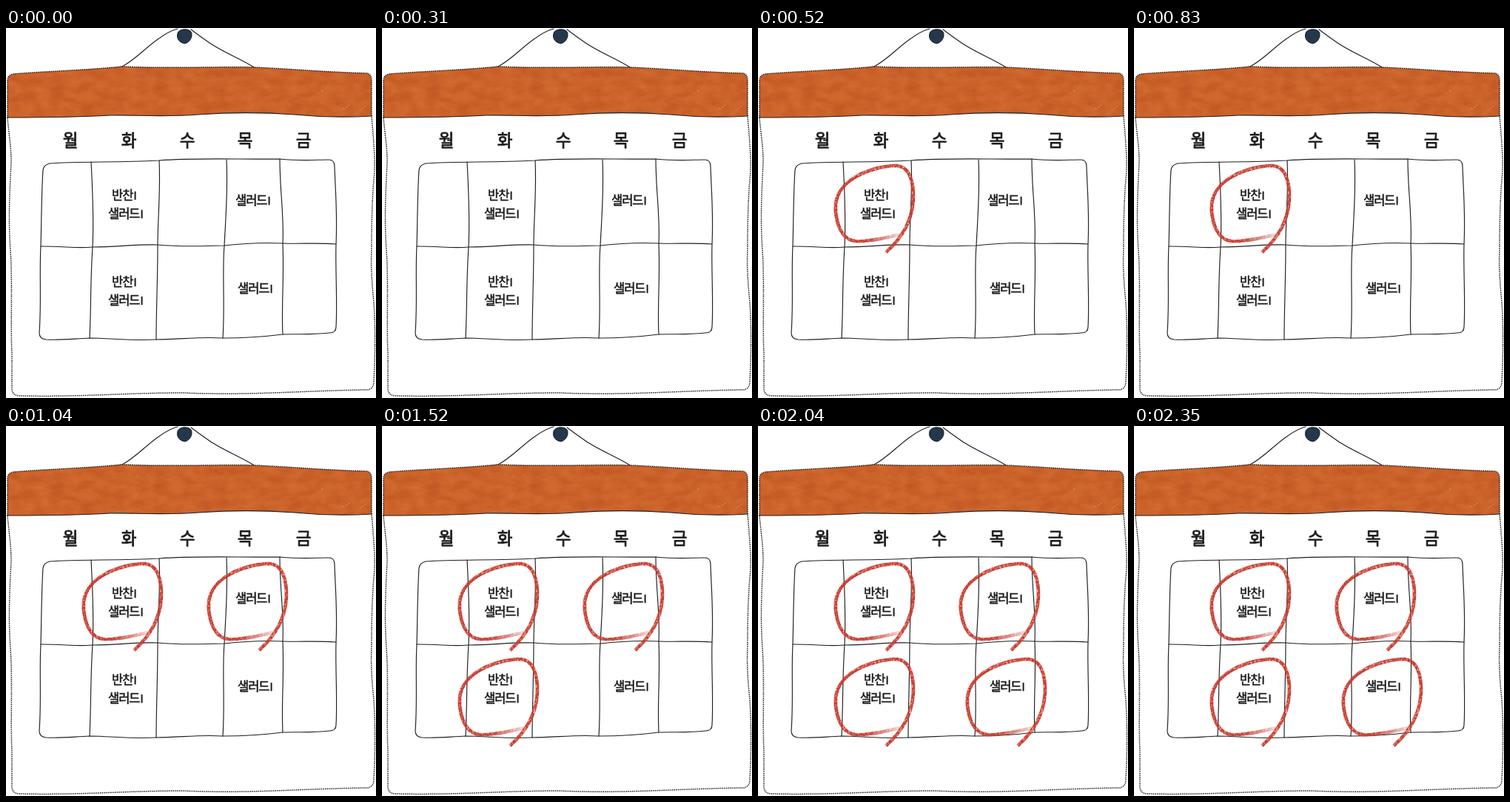
An HTML page that plays this animation: 500 px wide and 500 px high, repeating every 2560 ms.

```html
<!DOCTYPE html>
<html lang="ko">
<head>
<meta charset="utf-8">
<title>Weekly calendar</title>
<style>
html, body { margin: 0; width: 100%; height: 100%; overflow: hidden; background: #fff; }
svg { display: block; width: 100vw; height: 100vh; }
text { font-family: "Noto Sans CJK KR", "Noto Sans CJK", sans-serif; fill: #1d1d1d; stroke: #1d1d1d; stroke-linejoin: round; }
.days { font-size: 22.5px; stroke-width: .8px; text-anchor: middle; }
.notes text { font-size: 16.5px; letter-spacing: -1px; stroke-width: .55px; }
.notes tspan { font-size: 14px; }
.ink { fill: none; stroke: #1e1e1e; stroke-width: 1.15; stroke-linecap: round; stroke-linejoin: round; }
.dots { fill: none; stroke: #111; stroke-width: 1.5; stroke-dasharray: 1.4 1.2; }
.ring { opacity: 0; animation: 2560ms step-end infinite; }
.r1 { animation-name: show1; }
.r2 { animation-name: show2; }
.r3 { animation-name: show3; }
.r4 { animation-name: show4; }
@keyframes show1 { 0% { opacity: 0 } 20.3125%, 100% { opacity: 1 } }
@keyframes show2 { 0% { opacity: 0 } 40.625%, 100% { opacity: 1 } }
@keyframes show3 { 0% { opacity: 0 } 59.375%, 100% { opacity: 1 } }
@keyframes show4 { 0% { opacity: 0 } 79.6875%, 100% { opacity: 1 } }
</style>
</head>
<body>
<svg viewBox="0 0 500 500">
  <defs>
    <filter id="leather" x="0" y="0" width="1" height="1" color-interpolation-filters="sRGB">
      <feTurbulence type="fractalNoise" baseFrequency=".05 .09" numOctaves="5" seed="4"/>
      <feColorMatrix values=".1 0 0 0 .745  .12 0 0 0 .325  .08 0 0 0 .125  0 0 0 0 1"/>
      <feComposite in2="SourceGraphic" operator="in"/>
    </filter>
    <filter id="crayon" filterUnits="userSpaceOnUse" x="95" y="175" width="125" height="140" color-interpolation-filters="sRGB">
      <feTurbulence type="fractalNoise" baseFrequency=".4" numOctaves="2" seed="9" result="grain"/>
      <feColorMatrix values="0 0 0 0 0  0 0 0 0 0  0 0 0 0 0  1.7 0 0 0 .04" result="mask"/>
      <feDisplacementMap in="SourceGraphic" in2="grain" scale="1.5" xChannelSelector="R" yChannelSelector="G" result="rough"/>
      <feComposite in="rough" in2="mask" operator="in"/>
    </filter>
    <linearGradient id="fade" gradientUnits="userSpaceOnUse" x1="193" y1="278" x2="150" y2="287">
      <stop offset="0" stop-color="#c83c2f" stop-opacity=".2"/>
      <stop offset="1" stop-color="#c83c2f"/>
    </linearGradient>
    <g id="ring" fill="none" stroke="#c83c2f" stroke-width="4.7" filter="url(#crayon)">
      <path d="M192 279C178 282 165 286 150 287" stroke="url(#fade)"/>
      <path d="M150 287C132 290 121 288 114 277C107 267 104 250 105 238C107 221 119 208 134 200C150 191 172 186 187 186C202 187 207 200 209 214C212 233 208 254 199 271C192 284 183 294 173 303"/>
    </g>
  </defs>

  <path class="dots" d="M2 121C4 145 7 160 7 182C5 220 3 260 6 300C9 350 6 400 8 440L8 488Q9 497 18 497C100 499 160 493 240 493C330 497 400 490 488 489Q497 488 497 478C499 440 499 400 497 370C494 340 493 320 494 300C494 260 495 230 497 205C500 180 496 145 494 118"/>

  <path filter="url(#leather)" d="M2 121L2 71Q2 63 11 62C60 58 110 57 157 52C220 55 280 52 335 53C380 55 440 60 486 61Q493 61 494 70L494 119C460 121 420 120 390 117C350 114 300 114 260 117C210 121 170 117 140 118C90 121 50 121 2 121Z"/>
  <path class="dots" d="M2 121L2 71Q2 63 11 62C60 58 110 57 157 52C220 55 280 52 335 53C380 55 440 60 486 61Q493 61 494 70L494 119"/>
  <path class="ink" d="M494 119C460 121 420 120 390 117C350 114 300 114 260 117C210 121 170 117 140 118C90 121 50 121 2 121"/>
  <path d="M427 85h4M456 109l9-5M478 111l9-6" fill="none" stroke="#f3d5bf" stroke-dasharray="1 3"/>

  <path class="ink" d="M157 52C173 44 185 30 204 16C212 10 221 4 232 1"/>
  <path class="ink" d="M250 2C258 8 266 14 275 20C292 32 318 42 335 53"/>
  <path d="M232 7C234 1 246 0 250 5C253 11 249 19 242 21C234 20 230 14 232 7Z" fill="#25374a" stroke="#111b25"/>

  <g class="days">
    <text x="87" y="160">월</text>
    <text x="166" y="160">화</text>
    <text x="245" y="160">수</text>
    <text x="323" y="160">목</text>
    <text x="402" y="160">금</text>
  </g>

  <g class="ink">
    <path d="M50 192Q51 185 59 183C100 180 150 182 207 179C260 175 320 178 370 177C400 180 420 178 436 178Q444 178 444 187C445 220 448 250 446 292C445 330 448 370 446 404Q446 412 437 412C410 415 390 413 374 414C350 417 320 419 293 419C260 417 235 421 203 421C170 423 140 419 113 419C90 420 75 422 54 421Q45 420 45 412C48 370 45 330 47 295C48 260 48 220 50 192Z"/>
    <path d="M47 295C80 295 95 298 117 296C150 296 175 292 205 293C235 296 265 295 295 294C330 290 355 290 374 291C400 292 420 290 446 292"/>
    <path d="M115 181C117 220 119 255 117 296C114 340 115 380 113 419"/>
    <path d="M207 179C209 220 205 260 205 293C205 340 203 380 203 421"/>
    <path d="M298 178C300 220 297 255 295 294C292 330 296 375 293 419"/>
    <path d="M370 177C370 220 376 255 374 291C376 340 372 375 374 414"/>
  </g>

  <g class="notes">
    <text x="143" y="232">반찬<tspan dx="1">I</tspan></text>
    <text x="138" y="257">샐러드<tspan dx="1">I</tspan></text>
    <text x="310" y="239">샐러드<tspan dx="1">I</tspan></text>
    <text x="143" y="349">반찬<tspan dx="1">I</tspan></text>
    <text x="138" y="374">샐러드<tspan dx="1">I</tspan></text>
    <text x="313" y="358">샐러드<tspan dx="1">I</tspan></text>
  </g>

  <use class="ring r1" href="#ring"/>
  <use class="ring r2" href="#ring" x="169"/>
  <use class="ring r3" href="#ring" y="129"/>
  <use class="ring r4" href="#ring" x="178" y="129"/>
</svg>
</body>
</html>
```
